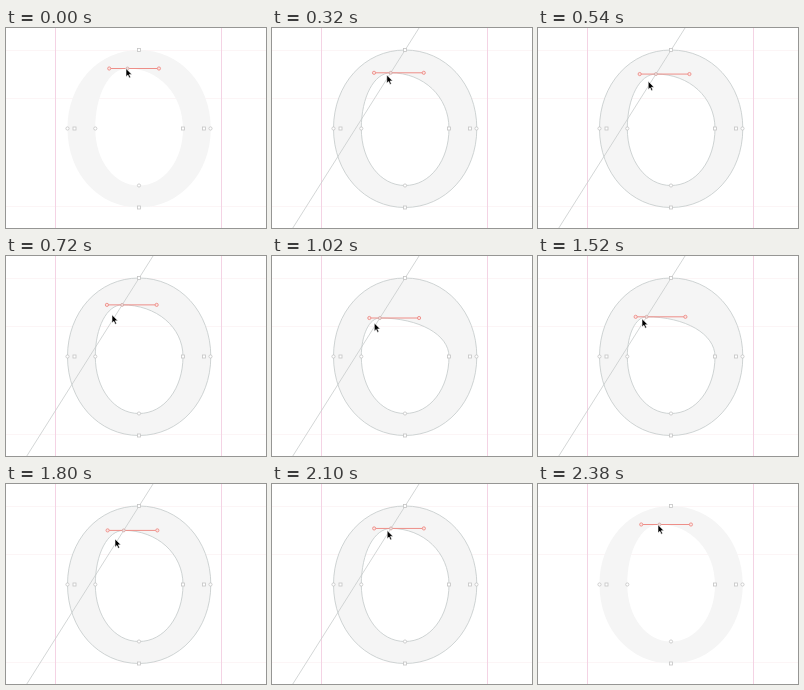
An HTML page for the animation above (2400 ms loop, 260 by 200 pixels).

```html
<!DOCTYPE html>
<html>
<head>
<meta charset="utf-8">
<style>
html, body { margin: 0; width: 100%; height: 100%; overflow: hidden; background: #fff; }
svg { display: block; }
</style>
</head>
<body>
<svg width="260" height="200" viewBox="0 0 260 200" fill="none">
  <path d="M0 22.5H260M0 70.5H260M0 178.5H260" stroke="#fcf5f6"/>
  <path d="M49.5 0V200M215.5 0V200" stroke="#f4d3e4"/>
  <path id="glyph" fill="#f5f5f5" fill-rule="evenodd" stroke-width=".8"/>
  <path id="guide" d="M20.8 200L147 0" stroke="#c8cccc" stroke-width=".8"/>
  <g id="nodes" fill="#fff" stroke="#c4c4c4" stroke-width=".8"></g>
  <g id="handle" stroke="#ee8e88">
    <path id="bar"/>
    <g fill="#fbe4e2" stroke-width=".9"><circle id="left" r="1.6"/><circle id="right" r="1.6"/></g>
    <circle id="node" r="1.5" fill="#f4dcda" stroke="#cdaaa8" stroke-width=".8"/>
  </g>
  <path id="cursor" d="M0 0V8.2L1.9 6.5L3.2 9.4L4.6 8.8L3.3 5.9H5.9Z" fill="#000" stroke="#fff" stroke-width=".6"/>
</svg>
<script>
const LOOP = 2400, DRAG_START = 80, K = 0.567;
const $ = id => document.getElementById(id);
const set = (id, attrs) => { for (const a in attrs) $(id).setAttribute(a, attrs[a]); };

// [time, node y] and [time, cursor x, cursor y] on the way down
const nodeKeys = [[0, 40.5], [80, 40.5], [320, 44.8], [600, 46.4], [720, 48.8], [880, 60.9], [1020, 62], [1140, 62.5]];
const cursorKeys = [[0, 120, 40.5], [40, 120, 41], [320, 114.8, 47], [600, 109, 55], [720, 106, 58.8],
  [880, 104, 62.8], [1020, 102.3, 67], [1140, 101.5, 68.5]];

function at(keys, t) {
  const i = keys.findIndex(k => k[0] > t);
  if (i < 0) return keys[keys.length - 1].slice(1);
  const a = keys[i - 1], b = keys[i], p = (t - a[0]) / (b[0] - a[0]);
  return a.slice(1).map((v, j) => v + (b[j + 1] - v) * p);
}

// Closed oval through four extreme points; side points share one height
function oval(l, r, mid, top, bottom, topX, bottomX) {
  const arc = (x, y, ex, ey, vertical) => vertical
    ? `C${x} ${y + (ey - y) * K} ${ex + (x - ex) * K} ${ey} ${ex} ${ey}`
    : `C${x + (ex - x) * K} ${y} ${ex} ${ey + (y - ey) * K} ${ex} ${ey}`;
  return `M${l} ${mid}` + arc(l, mid, topX, top, true) + arc(topX, top, r, mid, false)
    + arc(r, mid, bottomX, bottom, true) + arc(bottomX, bottom, l, mid, false) + 'Z';
}

const square = (x, y) => `<rect x="${x - 1.5}" y="${y - 1.5}" width="3" height="3"/>`;
const dot = (x, y) => `<circle cx="${x}" cy="${y}" r="1.6"/>`;
$('nodes').innerHTML = square(133, 22) + square(133, 179.5) + square(68.5, 100.5) + square(198, 100.5)
  + square(177, 100.5) + dot(61.5, 100.5) + dot(204.5, 100.5) + dot(89.3, 100.5) + dot(133, 157.5);

const outer = oval(61.5, 204.8, 100.5, 22, 179.5, 133, 133);

function draw(now) {
  const phase = now % LOOP, t = Math.min(phase, LOOP - phase);
  const [y] = at(nodeKeys, t), [cx, cy] = at(cursorKeys, t);
  const x = 147 - y * 0.631;
  const left = x - (x - 89.3) * K, right = x + (177 - x) * K;
  const dragging = t >= DRAG_START;
  set('glyph', {
    d: outer + oval(89.3, 177, 100.5, y, 157.5, x, 133),
    stroke: dragging ? '#c3cac9' : 'none'
  });
  set('guide', { visibility: dragging ? 'visible' : 'hidden' });
  set('bar', { d: `M${left} ${y}H${right}` });
  set('left', { cx: left, cy: y });
  set('right', { cx: right, cy: y });
  set('node', { cx: x, cy: y });
  set('cursor', { transform: `translate(${cx} ${cy})` });
}

function tick() {
  draw(performance.now());
  requestAnimationFrame(tick);
}
tick();
</script>
</body>
</html>
```
